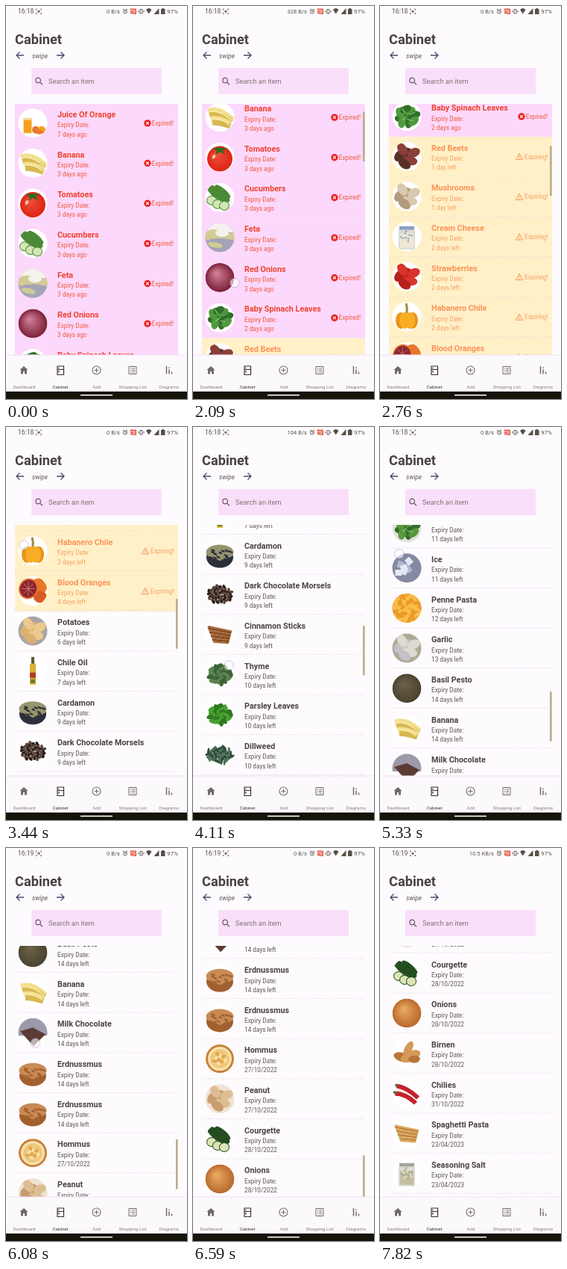
Write an HTML page with a canvas that moves like this. It is 243 px wide and 526 px high and loops after 8 s.

```html
<!DOCTYPE html>
<html lang="en">
<head>
<meta charset="utf-8">
<title>Cabinet</title>
<style>
html, body { margin: 0; width: 100%; height: 100%; overflow: hidden; background: #fdfbfe; }
canvas { display: block; width: 243px; height: 526px; }
</style>
</head>
<body>
<canvas></canvas>
<script>
const W = 243, H = 526, LOOP = 8000, PITCH = 53.65, TOP = 131, NAV = 467;
const canvas = document.querySelector('canvas'), c = canvas.getContext('2d');
const scale = Math.max(1, devicePixelRatio || 1);
canvas.width = W * scale;
canvas.height = H * scale;

// name, due, picture kind, main colour, second colour, picture background
const items = [
  ['Juice Of Orange', '7 days ago', 'glass', '#f5a01d', '#e8792c'],
  ['Banana', '3 days ago', 'bananas', '#f3df8c', '#d8b850'],
  ['Tomatoes', '3 days ago', 'ball', '#dc2414', '#2f6a22'],
  ['Cucumbers', '3 days ago', 'slices', '#4a8a35', '#d3e6b4'],
  ['Feta', '3 days ago', 'cheese', '#f4f2ec', '#d2cb94', '#a4a4b8'],
  ['Red Onions', '3 days ago', 'orb', '#d08098', '#7c2038'],
  ['Baby Spinach Leaves', '2 days ago', 'leaves', '#4f9a3c', '#2f7028'],
  ['Red Beets', '1 day left', 'chunks', '#8a4038', '#57302a'],
  ['Mushrooms', '1 day left', 'chunks', '#d8c8ae', '#b49a7c'],
  ['Cream Cheese', '2 days left', 'jar', '#f0e8d4', '#8aa0c0'],
  ['Strawberries', '2 days left', 'chunks', '#d8342c', '#b8201c'],
  ['Habanero Chile', '2 days left', 'pumpkin', '#f8ae24', '#a08a3c'],
  ['Blood Oranges', '4 days left', 'citrus', '#8c2430', '#e8762a'],
  ['Potatoes', '6 days left', 'chunks', '#ecc98c', '#dcb070', '#a9a4a4'],
  ['Chile Oil', '7 days left', 'bottle', '#d9b03a', '#b03c24'],
  ['Cardamon', '9 days left', 'bowl', '#98946c', '#2c303c'],
  ['Dark Chocolate Morsels', '9 days left', 'morsels', '#5c4438', '#2c1e18'],
  ['Cinnamon Sticks', '9 days left', 'fan', '#a8683a', '#80481f'],
  ['Thyme', '10 days left', 'pile', '#5c8450', '#3c6238'],
  ['Parsley Leaves', '10 days left', 'pile', '#4aa030', '#2d7a20'],
  ['Dillweed', '10 days left', 'herb', '#52735a', '#2f4f3c'],
  ['Peppers', '11 days left', 'pepper', '#2a6418', '#173f0f'],
  ['Lemongrass', '11 days left', 'stalks', '#dce0b4', '#a9bb78', '#9997a9'],
  ['White-wine Vinegar', '11 days left', 'jug', '#d8ad5c', '#4a3c2c'],
  ['Fresh Basil Leaf', '11 days left', 'leaves', '#58973f', '#316d2a', '#dfe2dd'],
  ['Ice', '11 days left', 'cubes', '#e6e9f4', '#b4b9d0', '#858aa3'],
  ['Penne Pasta', '12 days left', 'tubes', '#f9bf4a', '#e99a28', '#f2ab34'],
  ['Garlic', '13 days left', 'chunks', '#dedbd0', '#c3c1c8', '#aeaa98'],
  ['Basil Pesto', '14 days left', 'orb', '#6b6146', '#4a4431'],
  ['Banana', '14 days left', 'bananas', '#f3df8c', '#d8b850'],
  ['Milk Chocolate', '14 days left', 'wedge', '#5a3c34', '#9c99a9'],
  ['Erdnussmus', '14 days left', 'bowl', '#c98b55', '#a2602f'],
  ['Erdnussmus', '14 days left', 'bowl', '#c98b55', '#a2602f'],
  ['Hommus', '27/10/2022', 'dish', '#f0c878', '#c98238'],
  ['Peanut', '27/10/2022', 'chunks', '#dfbd94', '#c79d70', '#efe3d2'],
  ['Courgette', '28/10/2022', 'slices', '#244e20', '#dde5b6'],
  ['Onions', '28/10/2022', 'orb', '#e9ab62', '#b9692c'],
  ['Birnen', '28/10/2022', 'roots', '#d49a58', '#b8743a'],
  ['Chilies', '31/10/2022', 'chilies', '#c4222c', '#4a7a2c'],
  ['Spaghetti Pasta', '23/04/2023', 'fan', '#dba95e', '#bd8440'],
  ['Seasoning Salt', '23/04/2023', 'jar', '#c4bf9f', '#a3a49c'],
];

// scroll offset over time, smoothed with monotone tangents
const path = [[0, 0], [1900, 0], [2090, 61], [2400, 250], [2750, 330], [3080, 345], [3440, 580.6],
  [3650, 660], [3950, 690], [4300, 930], [4700, 1014], [5030, 1040], [5330, 1309], [5650, 1350],
  [5840, 1350], [6210, 1600], [6590, 1645], [6750, 1650], [7080, 1867], [8000, 1867]];
// start, end, finger height at start
const drags = [[1900, 2420, 432], [3080, 3460, 394], [3950, 4320, 420],
  [5030, 5350, 439], [5840, 6230, 430], [6750, 7080, 430]];
const speeds = [[7500, '10.5 KB/s'], [5000, '0 B/s'], [3700, '104 B/s'], [2400, '0 B/s'], [1150, '328 B/s'], [0, '0 B/s']];

const slope = i => path[i + 1] ? (path[i + 1][1] - path[i][1]) / (path[i + 1][0] - path[i][0]) : 0;
function tangent(i) {
  const a = i ? slope(i - 1) : 0, b = slope(i);
  return a && b ? 2 * a * b / (a + b) : 0;
}
function scrollAt(t) {
  let i = 0;
  while (i < path.length - 2 && t >= path[i + 1][0]) i++;
  const [t0, a] = path[i], [t1, b] = path[i + 1], d = t1 - t0, u = (t - t0) / d, v = 1 - u;
  return a * v * v * (1 + 2 * u) + b * u * u * (3 - 2 * u) + d * u * v * (v * tangent(i) - u * tangent(i + 1));
}

const rand = n => { const x = Math.sin(n * 12.9898) * 43758.5453; return x - Math.floor(x); };
function text(s, x, y, size, color, style = '', align = 'left') {
  c.font = `${style} ${size}px Roboto, sans-serif`;
  c.fillStyle = color;
  c.textAlign = align;
  c.fillText(s, x, y);
}
function box(x, y, w, h, color) { c.fillStyle = color; c.fillRect(x, y, w, h); }
function oval(x, y, rx, ry, color, turn = 0) {
  c.fillStyle = color;
  c.beginPath();
  c.ellipse(x, y, rx, ry, turn, 0, 7);
  c.fill();
}
function shape(d, color) { c.fillStyle = color; c.fill(new Path2D(d)); }
function line(d, color, width = 1) { c.strokeStyle = color; c.lineWidth = width; c.stroke(new Path2D(d)); }
function sphere(r, a, b) {
  const g = c.createRadialGradient(-5, -6, 1, 0, 0, r);
  g.addColorStop(0, a);
  g.addColorStop(1, b);
  oval(0, 0, r, r, g);
}
function scatter(n, rx, ry, sx, sy, a, b, turn) {
  for (let k = 1; k <= n; k++) {
    const angle = k * 2.4, d = Math.sqrt(k / n);
    oval(Math.cos(angle) * d * sx, Math.sin(angle) * d * sy, rx, ry, k % 2 ? a : b, turn ?? rand(k) * 6);
  }
}

// pictures, drawn around the centre of a disc
const art = {
  glass(a, b) {
    box(-13, -7, 12, 21, '#f7d9a0'); box(-12, -4, 10, 17, a);
    oval(4, 9, 5, 5, b); oval(12, 9, 5, 5, a); oval(9, 12, 5, 3, b);
  },
  bananas(a, b) {
    for (let k = 0; k < 4; k++) {
      const color = k % 2 ? b : a;
      line(`M${-16 + k * 2} ${-8 + k * 5}Q${-2 + k} ${-14 + k * 7} ${17 - k} ${3 + k * 3}`, color, 7);
    }
    line('M-15-7Q-3-11 16 4M-13 2Q0 0 13 10', '#f8ecb4', 1.5);
  },
  ball(a, b) {
    c.translate(0, 2); sphere(17, '#f0503a', a); oval(-8, -3, 2, 3, '#fbc4b4', .5);
    shape('M0-15L-9-14L-4-10L-6-5L0-9L7-6L4-11L10-14Z', b);
  },
  slices(a, b) {
    oval(-2, -5, 18, 7, a, .6); oval(4, -8, 13, 4, a, .7);
    for (const [x, y] of [[-11, 4], [-3, 9], [6, 11]]) { oval(x, y, 7, 6.5, a); oval(x, y, 6, 5.5, b); }
  },
  cheese(a, b) {
    box(-20, -20, 40, 13, a); shape('M-20-7Q-8-14 0-8T20-9V4Q0-2-20 4Z', b);
    oval(3, -6, 9, 5, a); oval(-6, 10, 10, 3.5, b, .2);
  },
  chunks(a, b) { scatter(7, 9, 6, 13, 11, a, b); },
  orb(a, b) { sphere(19.5, a, b); },
  pile(a, b) { scatter(36, 4.5, 2.8, 15, 12, a, b); },
  morsels(a, b) { scatter(50, 2.6, 1.9, 17, 12, a, b); },
  leaves(a, b) { scatter(16, 8, 5, 12, 10, b, a); scatter(7, 5, .5, 10, 9, '#a8cf8c', a); },
  jar(a, b) {
    box(-10, -14, 20, 5, b); box(-11, -9, 22, 26, '#d9dad4'); box(-9, -4, 18, 19, a);
    scatter(18, 1.5, 1, 8, 8, b, '#e7e4d2');
  },
  pumpkin(a, b) {
    for (const x of [-8, 8, -3, 4]) oval(x, 5, 7, 11, Math.abs(x) > 5 ? '#ea9418' : a);
    line('M0-5Q1-12-1-18', b, 3);
  },
  citrus(a, b) {
    oval(8, -6, 11, 11, b); oval(10, 8, 9, 8, '#d85a24');
    oval(-6, -3, 13, 14, b, .4); oval(-6, -3, 11, 12, a, .4);
    for (let k = 0; k < 4; k++) {
      const x = Math.cos(k * .8) * 9, y = Math.sin(k * .8) * 10;
      line(`M${-6 - x} ${-3 - y}L${-6 + x} ${-3 + y}`, '#d88a78', .8);
    }
  },
  bottle(a, b) {
    box(-2, -19, 4, 10, '#5c5a2c'); box(-4, -10, 8, 28, a); box(-4, 2, 8, 7, b); box(-3, 11, 6, 5, '#6c7a2c');
  },
  bowl(a, b) {
    oval(0, 4, 18, 14, b); oval(0, -3, 18.5, 10, a); scatter(26, 3, 1.3, 16, 8, a, b, .4);
  },
  fan(a, b) {
    for (let k = 0; k < 9; k++) line(`M${-17 + k} ${-11 + k * 2.6}L${16 - k * .5} ${-4 + k * 1.9}`, k % 2 ? b : a, 2.4);
  },
  herb(a, b) { scatter(46, 5, 1.6, 17, 10, a, b); },
  pepper(a, b) {
    oval(-7, 3, 10, 13, a); oval(7, 3, 10, 13, a); oval(0, 5, 6, 13, b); oval(-8, -2, 2, 4, '#6a9a55', .4);
    line('M0-8Q-1-14 3-17', a, 4);
  },
  stalks(a, b) {
    for (let k = 0; k < 4; k++) line(`M${-20 + k * 4} ${12 + k * 3}L${10 + k * 4} ${-20 + k * 3}`, k % 2 ? b : a, 4);
  },
  jug(a, b) {
    box(-3, -18, 6, 8, b); shape('M-3-12H3L14 8V17H-14V8Z', '#b8a888'); shape('M-10 3H10L13 9V16H-13V9Z', a);
    line('M3-12L14 8V17H-14V8L-3-12', b, 1.5);
  },
  cubes(a, b) {
    for (let k = 0; k < 7; k++) {
      c.save(); c.translate(rand(k + 2) * 26 - 13, rand(k + 20) * 24 - 12); c.rotate(k);
      box(-4, -4, 9, 8, k % 2 ? b : a); c.restore();
    }
  },
  tubes(a, b) { scatter(34, 6, 2, 18, 18, a, b); },
  wedge(a, b) { box(-20, -20, 40, 24, b); shape('M-17-2L0-7L17 2L1 18Z', a); },
  dish(a, b) {
    oval(0, 0, 19, 19, b); oval(0, 0, 16, 16, '#f6e3b4'); oval(0, 0, 13, 13, a); scatter(9, 3, 2, 8, 8, '#e2a24c', '#f8e2ae');
  },
  roots(a, b) {
    oval(-7, 5, 11, 6, b, .3); oval(5, 4, 14, 7, a, -.4); oval(2, -6, 5, 11, a, .5); oval(10, 8, 8, 5, b);
  },
  chilies(a, b) {
    line('M-14-10Q0-8 15 6', a, 6); line('M-16 0Q-2 0 12 13', a, 6); line('M-16-12L-12-9M-18-2L-14 0', b, 3);
  },
};

function drawRow([name, due, kind, a, b, ground], i, y) {
  const state = i < 7 ? 0 : i < 13 ? 1 : 2;
  const head = ['#f1432e', '#fb9458', '#4c4340'][state], body = ['#ef5a3a', '#f6a060', '#5f5650'][state];
  if (state < 2) box(12, y, 219, PITCH + .4, ['#fcd8fc', '#fff0c8'][state]);
  if (state) {
    c.setLineDash([2, 2]);
    line(`M12 ${y + PITCH - .5}H231`, '#e6d4e2', .8);
    c.setLineDash([]);
  }
  c.save();
  c.translate(36, y + 26.5);
  c.beginPath();
  c.arc(0, 0, 19.5, 0, 7);
  c.clip();
  box(-20, -20, 40, 40, ground || '#fff');
  art[kind](a, b);
  c.restore();
  text(name, 69, y + 18.7, 10.8, head, 'bold');
  text('Expiry Date:', 69, y + 32.2, 8.25, body);
  text(due, 69, y + 44.5, 8.25, body);
  if (state === 0) {
    oval(190, y + 26.7, 4.7, 4.7, '#ee2020');
    line(`M188.2 ${y + 24.9}l3.6 3.6m0-3.6l-3.6 3.6`, '#fff', 1.2);
    text('Expired!', 195.8, y + 29.7, 8.25, body);
  } else if (state === 1) {
    line(`M187 ${y + 22.5}l4.6 8.2h-9.2zm0 3v2.6m0 .8v1`, head, 1);
    text('Expiring!', 194, y + 29.7, 8.25, body);
  }
}

function drawStatus(t) {
  const ink = '#565048';
  text(t < 5840 ? '16:18' : '16:19', 16, 10, 8.6, ink);
  line('M40.5 5.5V4H42M46 4h1.500V5.500M47.500 9V10.500H46M42 10.500H40.500V9', ink, .8);
  oval(44, 7.2, 1.7, 1.7, '#86706c');
  text(speeds.find(s => t >= s[0])[1], 153, 10, 7.6, ink, '', 'right');
  line('M162.500 7.500a2.500 2.500 0 1 0-5 0a2.500 2.500 0 1 0 5 0M160 6V7.500H161.200M157 5L158.500 3.700M161.500 3.700L163 5', ink, .9);
  box(167, 4, 7.5, 6.5, '#f0a090');
  line('M167 5V4H174.500V10.500H171.500M167 7a3.500 3.500 0 0 1 3.500 3.500M167 9a1.500 1.500 0 0 1 1.500 1.500', '#e0453a', 1);
  line('M180 4.500H183V10H180ZM178 6V8.500M185 6V8.500', ink, .9);
  shape('M188 5Q191.700 1 195.500 5L191.700 10.500Z', ink);
  shape('M198.500 11L205.500 3V11Z', ink);
  shape('M208 4H209.500V3H212V4H213.500V11H208Z', ink);
  text('97%', 216, 10, 8.1, ink);
}

function drawHeader() {
  text('Cabinet', 12, 51, 18.2, '#48413e', 'bold');
  line('M24 66H14M18.500 61.500L14 66L18.500 70.500M68 66H78M73.500 61.500L78 66L73.500 70.500', '#4f4868', 1.3);
  text('swipe', 35, 69.5, 8.3, '#5c5458', 'italic');
  box(34, 83, 175, 35, '#fadffa');
  line('M46.500 99.500a3.300 3.300 0 1 0-6.600 0a3.300 3.300 0 1 0 6.600 0M45.600 102L49 105.200', '#655b62', 1.2);
  text('Search an item', 57, 104, 9.3, '#7d7274');
}

function drawNav() {
  const ink = '#706a68', dark = '#38322f';
  box(0, NAV, W, 49, '#fcf9fd');
  box(0, NAV - .5, W, 1, '#f4def4');
  shape('M24 482L18.500 487H20V492.500H23V489H25V492.500H28V487H29.500Z', ink);
  line('M69 482H77.500V493.500H69ZM69 486.500H77.500M71 483.800V485.300M71 488V490.500', dark, 1.2);
  line('M127 487.500a5.500 5.500 0 1 0-11 0a5.500 5.500 0 1 0 11 0M121.500 484.500V490.500M118.500 487.500H124.500', ink, 1.1);
  line('M165 482.500H175V492.500H165ZM167 485H168.200M169.200 485H173.200M167 487.500H168.200M169.200 487.500H173.200M167 490H168.200M169.200 490H173.200', ink, 1);
  line('M215.500 482V492.500M219 486.500V492.500M222.500 489.500V492.500M219 483.500V485', ink, 1.5);
  ['Dashboard', 'Cabinet', 'Add', 'Shopping List', 'Diagrams'].forEach((label, i) =>
    text(label, 24.5 + i * 48.6, 512, 6.2, i === 1 ? dark : '#857b74', '', 'center'));
  box(0, 516, W, 10, '#16130a');
  box(100, 520, 43, 1.6, '#f4f2f2');
}

function draw(t) {
  const scroll = scrollAt(t);
  c.setTransform(scale, 0, 0, scale, 0, 0);
  box(0, 0, W, H, '#fdfbfe');
  drawStatus(t);
  drawHeader();

  c.save();
  c.beginPath();
  c.rect(0, TOP, W, NAV - TOP);
  c.clip();
  items.forEach((item, i) => {
    const y = 130.2 + i * PITCH - scroll;
    if (y > TOP - PITCH && y < NAV) drawRow(item, i, y);
  });
  if (t >= 1900) {
    c.globalAlpha = Math.max(0, Math.min(1, (7650 - t) / 250));
    box(228, TOP + scroll * .1705, 2.7, 66.5, '#bcae8c');
  }
  c.restore();

  drawNav();
  const drag = drags.find(d => t >= d[0] && t < d[1]);
  if (drag) {
    const y = drag[2] - scroll + scrollAt(drag[0]);
    oval(56 - (371 - y) * .15, y, 6.2, 6.2, 'rgba(255,255,255,.6)');
    c.strokeStyle = 'rgba(150,140,185,.6)';
    c.lineWidth = .8;
    c.stroke();
  }
}

function tick(now) {
  draw(now % LOOP);
  requestAnimationFrame(tick);
}
requestAnimationFrame(tick);
</script>
</body>
</html>
```
